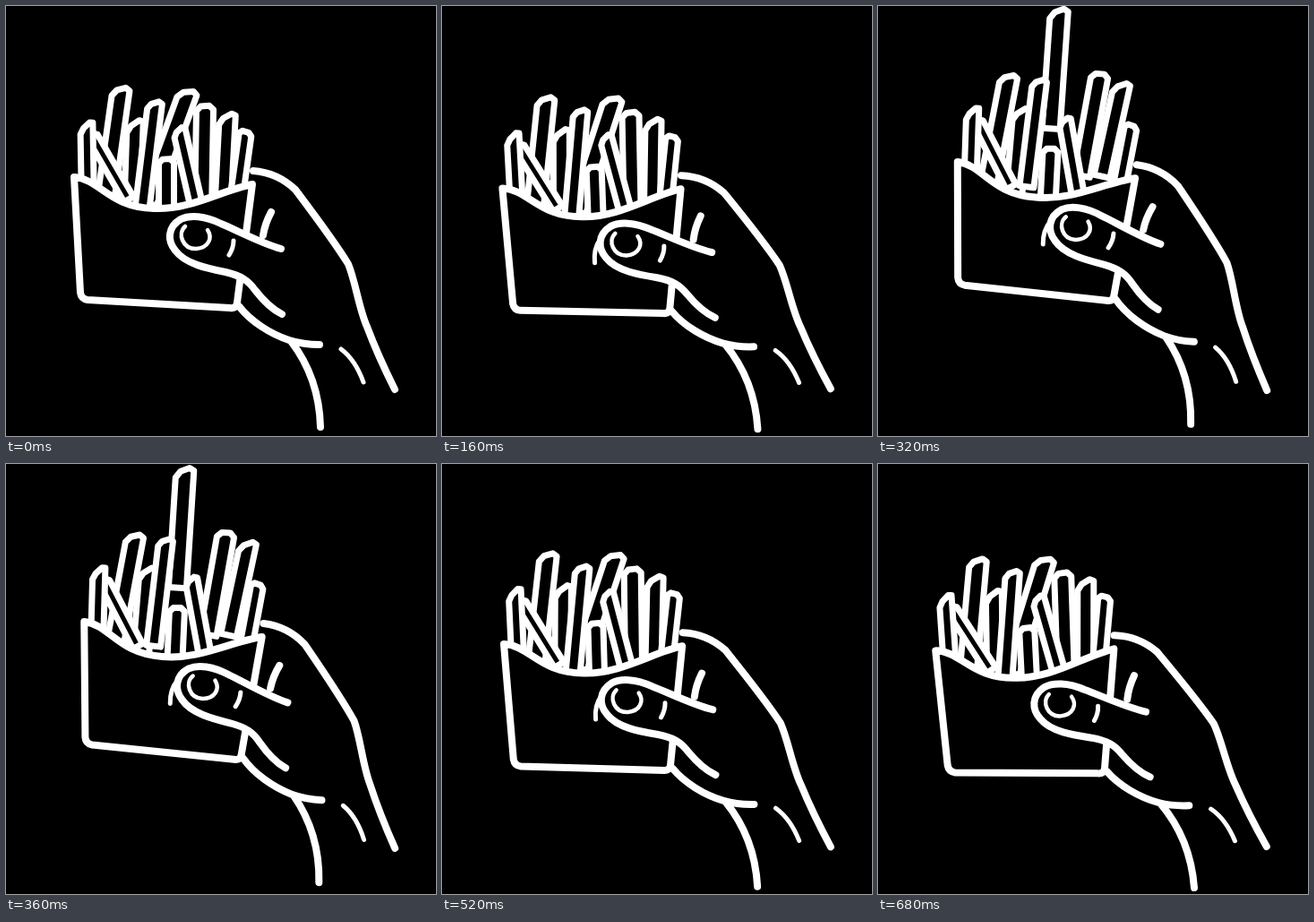
Recreate the animation shown at these times as an HTML page with a canvas. Size 480 by 480 pixels, loop 1000 ms.

```html
<!DOCTYPE html>
<html>
<head>
<meta charset="utf-8">
<title>Fries in hand</title>
<style>
html, body { margin: 0; width: 100%; height: 100%; overflow: hidden; background: #000; }
canvas { display: block; width: 100vw; height: 100vh; }
</style>
</head>
<body>
<canvas width="480" height="480"></canvas>
<script>
const ctx = document.querySelector('canvas').getContext('2d');
const LOOP = 1000, STEP = 40;
const WRIST = { x: 413, y: 432 };
const FRY_BASE = 225;

// Key points: [ms, value]
const swing = [[0, 0], [80, -11.7], [160, -2.1], [240, 3.6], [360, 2.6], [520, -1.7], [600, -4.2], [680, -2.9]];
const lift = [[160, 0], [320, 2], [400, 2], [520, 0]];

const fry = (x, y, width, tilt, slant, push = 0) => ({ x, y, width, tilt, slant, push });

// Back to front; push is how far a fry rises, its sign the side it leans to.
const fries = [
  fry(128, 95, 19, 8, 8),
  fry(144, 133, 18, 2, 13),
  fry(97, 145, 12, -30, 0),
  fry(90, 135, 14, -1, 13),
  fry(222, 114, 19, 1, 2, 27),
  fry(247, 125, 18, 3, 11, 27),
  fry(267, 142, 14, 8, -2),
  fry(202, 98, 20, 20, 9, -79),
  fry(166, 110, 16, 7, 7, -12),
  fry(194, 140, 14, -13, 8),
  fry(179, 173, 17, 0, 1)
];

const box = new Path2D('M76 191C105 193 115 225 165 226C205 228 240 206 275 199L258 331Q257 338 250 337L91 328Q84 327 83 320Z');
const thumb = new Path2D('M307 271C285 265 255 249 240 243C222 234 205 233 195 238C180 247 180 262 189 273C200 288 225 293 245 297C262 301 270 306 278 317C288 330 298 339 308 344');
const back = new Path2D('M276 184Q303 186 323 205C338 225 366 262 382 288C390 307 394 338 403 358Q415 390 434 428');
const finger = new Path2D('M296 230Q289 243 287 256');
const palm = new Path2D('M260 335C273 352 295 366 316 373Q332 378 350 378M318 374C338 400 350 430 351 470');
const creases = new Path2D('M254 262Q254 270 249 278M374 383Q390 395 399 420');
const nail = new Path2D('M200 246C191 254 197 271 212 271C226 270 231 259 225 250');
const thumbShade = new Path2D('M183 252Q175 262 176 278');

let bold = 1;

function track(keys, t) {
  const next = keys.findIndex(([time]) => time > t);
  if (next < 1) return keys.at(next)[1];
  const [t0, a] = keys[next - 1], [t1, b] = keys[next];
  return a + (b - a) * (t - t0) / (t1 - t0);
}

function ink(path, width, filled) {
  if (filled) ctx.fill(path);
  ctx.lineWidth = width * bold;
  ctx.stroke(path);
}

function drawFry({ x, y, width, tilt, slant, push }, amount) {
  const half = width / 2, peak = width / 4, length = FRY_BASE - y;
  const rise = push * amount / 2;
  const hop = 6 * Math.sin(Math.PI * amount / 2);
  const path = new Path2D();
  path.moveTo(-half, length);
  path.lineTo(-half, slant / 2);
  path.lineTo(-half / 2, slant / 4 - peak);
  path.lineTo(half / 2, -slant / 4 - peak);
  path.lineTo(half, -slant / 2);
  path.lineTo(half, length);
  path.closePath();

  ctx.save();
  ctx.translate(x + 0.27 * rise - hop, y - Math.abs(rise) + peak / 2);
  ctx.rotate((tilt + 0.24 * rise) * Math.PI / 180);
  ink(path, 7, true);
  ctx.restore();
}

function draw(now) {
  const t = Math.floor(now % LOOP / STEP) * STEP;
  const angle = track(swing, t);
  const amount = track(lift, t);
  bold = 1 + Math.max(0, -angle - 5) / 25;

  ctx.setTransform(1, 0, 0, 1, 0, 0);
  ctx.fillStyle = '#000';
  ctx.strokeStyle = '#fff';
  ctx.lineCap = ctx.lineJoin = 'round';
  ctx.fillRect(0, 0, 480, 480);
  ctx.translate(WRIST.x, WRIST.y);
  ctx.rotate(angle * Math.PI / 180);
  ctx.translate(-WRIST.x, -WRIST.y);

  ink(back, 8);
  fries.forEach(f => drawFry(f, amount));
  ink(box, 8, true);
  ink(thumb, 8, true);
  ink(finger, 8);
  ink(palm, 8);
  ink(creases, 5);
  ink(nail, 4.5);
  if (t >= 80 && t < 560) ink(thumbShade, 5);
}

const start = performance.now();
function tick() {
  draw(performance.now() - start);
  requestAnimationFrame(tick);
}
tick();
</script>
</body>
</html>
```
